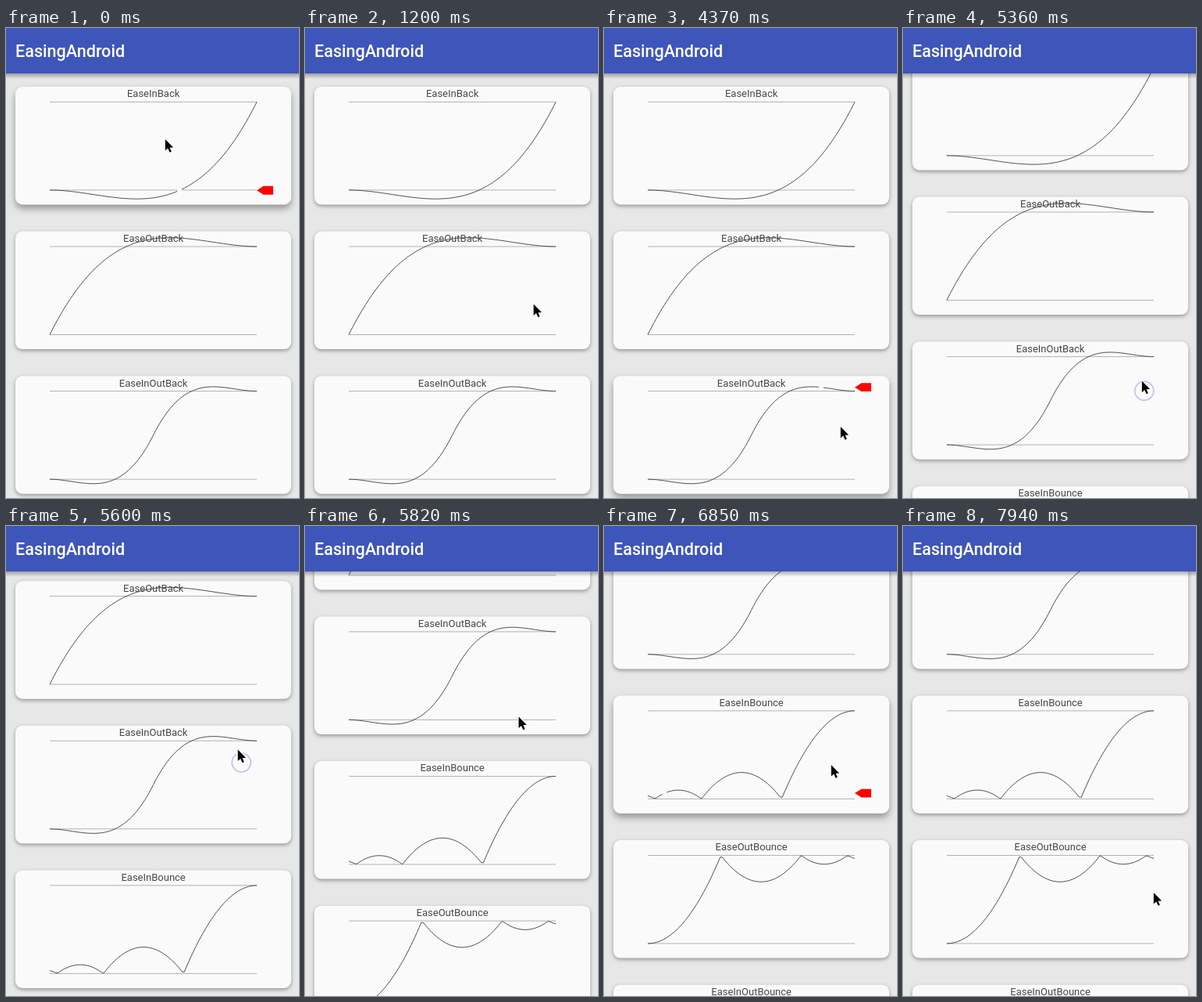
Recreate the animation shown at these times as an HTML page with a canvas. Size 375 by 600 pixels, loop 8000 ms.

```html
<!DOCTYPE html>
<html lang="en">
<head>
<meta charset="utf-8">
<title>EasingAndroid</title>
<style>
  html, body { margin: 0; width: 100%; height: 100%; overflow: hidden; background: #e7e7e7; }
  canvas { display: block; }
</style>
</head>
<body>
<canvas id="stage" width="375" height="600"></canvas>
<script>
const ctx = document.getElementById('stage').getContext('2d');
const LOOP = 8000, RUN = 1000, PRESS = 210;
const PITCH = 184.6, CARD_TOP = 75, CARD_H = 150.5;
const LEFT = 56, RIGHT = 321, TOP_LINE = 19.4, BOTTOM_LINE = 131.9;
const S = 1.70158;

const clamp = v => Math.max(0, Math.min(1, v));
const mix = (a, b, k) => a + (b - a) * k;

// Easing curves
const inBack = t => t * t * ((S + 1) * t - S);
const outBack = t => 1 - inBack(1 - t);
const outBounce = t => {
  const hop = (center, floor) => 8 * (t - center) ** 2 + floor;
  if (t < 0.3535) return hop(0, 0);
  if (t < 0.7408) return hop(0.54719, 0.7);
  if (t < 0.9644) return hop(0.8526, 0.9);
  return hop(1.0435, 0.95);
};
const inBounce = t => 1 - outBounce(1 - t);
const inOut = (easeIn, easeOut) => t =>
  t < 0.5 ? easeIn(2 * t) / 2 : (1 + easeOut(2 * t - 1)) / 2;

const cards = [
  { title: 'EaseInBack', ease: inBack, start: -626 },
  { title: 'EaseOutBack', ease: outBack, start: 1515 },
  { title: 'EaseInOutBack', ease: inOut(inBack, outBack), start: 3534 },
  { title: 'EaseInBounce', ease: inBounce, start: 6770 },
  { title: 'EaseOutBounce', ease: outBounce },
  { title: 'EaseInOutBounce', ease: inOut(inBounce, outBounce) }
];

// Keys: [time, x, y] and [time, offset]
const pointerKeys = [
  [0, 203, 142], [420, 203, 142], [790, 258, 272], [970, 258, 272],
  [1270, 297, 365], [2400, 297, 365], [2560, 300, 372], [2910, 302, 509],
  [4600, 302, 509], [4890, 306, 512], [5100, 306, 512], [5360, 305, 451],
  [5600, 296, 286], [5680, 285, 248], [5780, 275, 243], [6050, 268, 257],
  [6450, 290, 305], [6900, 290, 305], [7490, 316, 457], [7620, 320, 468]
];
const scrollKeys = [
  [5130, 0], [5360, 43.6], [5600, 188.7], [5700, 258],
  [5850, 342], [6050, 398.3], [6400, 412.3]
];
const DRAG = [5070, 5680];

// Smooth monotone interpolation through keys
function track(keys, t, c = 1) {
  const last = keys.length - 1;
  if (t <= keys[0][0]) return keys[0][c];
  if (t >= keys[last][0]) return keys[last][c];
  const i = keys.findIndex(k => k[0] > t) - 1;
  const slope = n => n < 0 || n >= last ? 0
    : (keys[n + 1][c] - keys[n][c]) / (keys[n + 1][0] - keys[n][0]);
  const tangent = n => {
    const a = slope(n - 1), b = slope(n);
    if (a * b <= 0) return 0;
    return Math.sign(a) * Math.min(Math.abs(a + b) / 2, 3 * Math.abs(a), 3 * Math.abs(b));
  };
  const span = keys[i + 1][0] - keys[i][0], u = (t - keys[i][0]) / span, v = 1 - u;
  return v * v * (1 + 2 * u) * keys[i][c] + u * u * (3 - 2 * u) * keys[i + 1][c]
    + span * u * v * (v * tangent(i) - u * tangent(i + 1));
}

function polygon(points) {
  ctx.beginPath();
  points.forEach(([x, y]) => ctx.lineTo(x, y));
  ctx.closePath();
}

function line(y) {
  ctx.beginPath();
  ctx.moveTo(LEFT, y);
  ctx.lineTo(RIGHT, y);
  ctx.strokeStyle = '#b2b2b2';
  ctx.lineWidth = 1;
  ctx.stroke();
}

function drawCard({ title, ease, start = Infinity }, y, t) {
  const lift = clamp((t - start + PRESS) / 110) * (1 - clamp((t - start - 900) / 130));
  const valueY = v => y + mix(BOTTOM_LINE, TOP_LINE, v);

  ctx.save();
  ctx.shadowColor = 'rgba(0,0,0,.36)';
  ctx.shadowBlur = mix(5, 10, lift);
  ctx.shadowOffsetY = mix(2, 5, lift);
  ctx.fillStyle = '#fafafa';
  ctx.beginPath();
  ctx.roundRect(12, y, 353, CARD_H, 9);
  ctx.fill();
  ctx.restore();

  ctx.fillStyle = '#484848';
  ctx.font = '13px Roboto, sans-serif';
  ctx.textAlign = 'center';
  ctx.fillText(title, 188.6, y + 13.3);

  line(y + TOP_LINE);
  line(y + BOTTOM_LINE);

  ctx.beginPath();
  for (let i = 0; i <= 100; i++) ctx.lineTo(mix(LEFT, RIGHT, i / 100), valueY(ease(i / 100)));
  ctx.strokeStyle = '#3c3c3c';
  ctx.lineWidth = 0.9;
  ctx.stroke();

  const p = (t - start) / RUN;
  if (p < 0 || p > 1) return;
  const my = valueY(ease(p));
  ctx.fillStyle = '#fafafa';
  ctx.beginPath();
  ctx.arc(mix(LEFT, RIGHT, p), my, 3.1, 0, 2 * Math.PI);
  ctx.fill();
  ctx.fillStyle = '#f00';
  polygon([[321, my], [329.5, my - 5.4], [342, my - 5.4], [342, my + 5.4], [329.5, my + 5.4]]);
  ctx.fill();
}

function drawHeader() {
  const shade = ctx.createLinearGradient(0, 58, 0, 65);
  shade.addColorStop(0, 'rgba(0,0,0,.3)');
  shade.addColorStop(1, 'rgba(0,0,0,0)');
  ctx.fillStyle = shade;
  ctx.fillRect(0, 58, 375, 7);
  ctx.fillStyle = '#3e55b9';
  ctx.fillRect(0, 0, 375, 58);
  ctx.fillStyle = '#fff';
  ctx.font = '500 21.6px Roboto, sans-serif';
  ctx.textAlign = 'left';
  ctx.fillText('EasingAndroid', 12, 36.5);
}

function drawPointer(t) {
  const touching = (t >= DRAG[0] && t < DRAG[1])
    || cards.some(({ start }) => t >= start - PRESS && t < start);
  if (touching) {
    const seen = t - 22;
    ctx.beginPath();
    ctx.arc(track(pointerKeys, seen, 1) + 3.5, track(pointerKeys, seen, 2) + 3, 12, 0, 2 * Math.PI);
    ctx.fillStyle = 'rgba(255,255,255,.35)';
    ctx.fill();
    ctx.strokeStyle = 'rgba(175,175,228,.65)';
    ctx.lineWidth = 2;
    ctx.stroke();
  }
  ctx.save();
  ctx.translate(track(pointerKeys, t, 1) + 0.8, track(pointerKeys, t, 2));
  polygon([[0, 0], [0, 14.6], [3.4, 11.5], [5.7, 16.8], [8, 15.8], [5.8, 10.7], [10.3, 10.5]]);
  ctx.lineJoin = 'round';
  ctx.lineWidth = 2;
  ctx.strokeStyle = '#fff';
  ctx.stroke();
  ctx.fillStyle = '#000';
  ctx.fill();
  ctx.restore();
}

function draw(t) {
  ctx.fillStyle = '#e7e7e7';
  ctx.fillRect(0, 0, 375, 600);
  const scroll = track(scrollKeys, t);
  cards.forEach((card, i) => drawCard(card, CARD_TOP + i * PITCH - scroll, t));
  drawHeader();
  drawPointer(t);
}

const begin = performance.now();
function tick() {
  draw((performance.now() - begin) % LOOP);
  requestAnimationFrame(tick);
}
tick();
</script>
</body>
</html>
```
